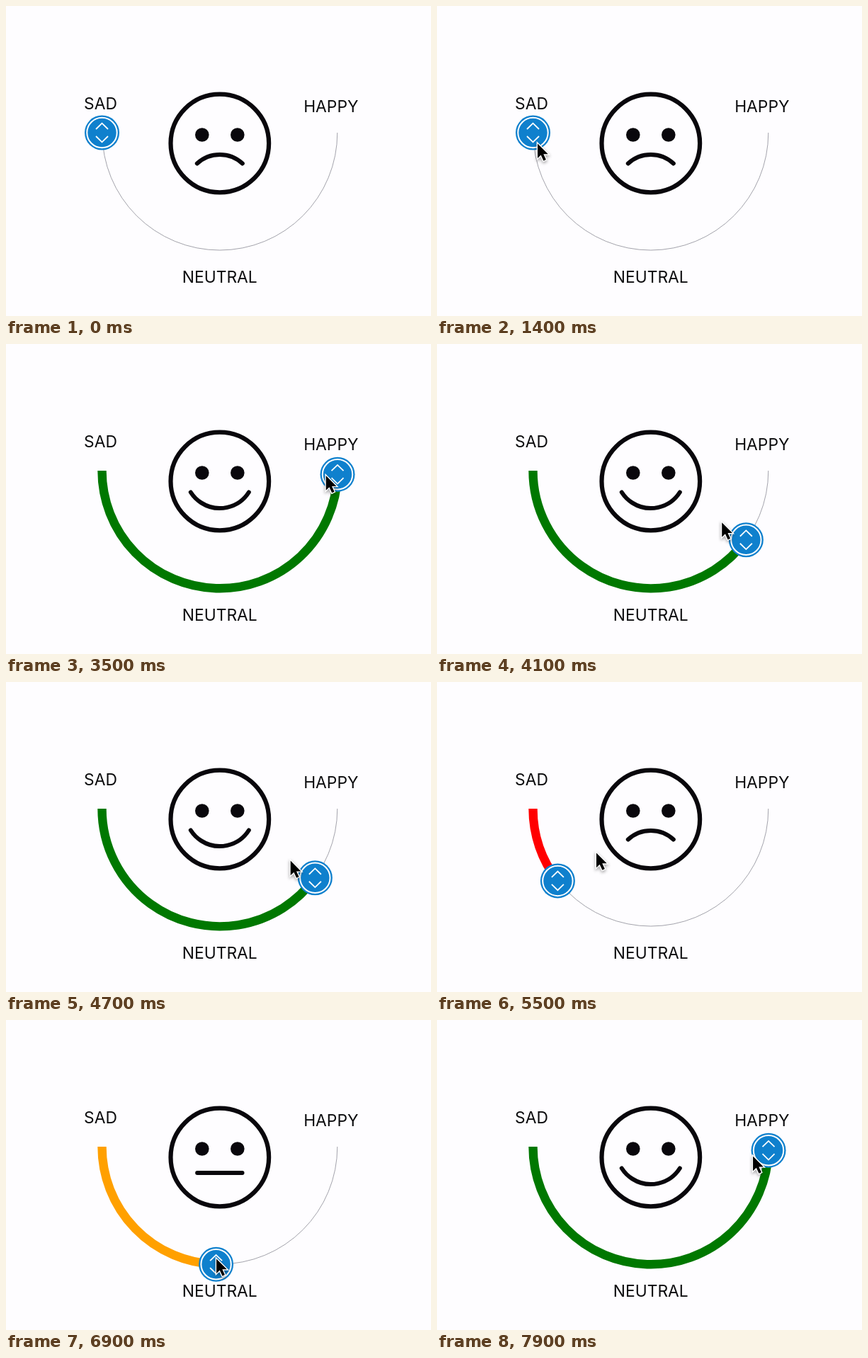
An HTML page with a canvas that plays this animation: 600 by 438 pixels, repeating every 8000 ms.

```html
<!DOCTYPE html>
<html lang="en">
<head>
<meta charset="utf-8">
<title>Mood slider</title>
<style>
  html, body { margin: 0; width: 100%; height: 100%; overflow: hidden; background: #fefdff; }
  svg, canvas { position: absolute; left: 0; top: 0; width: 600px; height: 438px; }
  text { font: 22.8px Inter, Roboto, sans-serif; fill: #0c0c0e; text-anchor: middle; }
</style>
</head>
<body>
<svg viewBox="0 0 600 438">
  <text x="133.5" y="146">SAD</text>
  <text x="458.8" y="150">HAPPY</text>
  <text x="301.8" y="391">NEUTRAL</text>
</svg>
<canvas id="stage" width="600" height="438"></canvas>
<script>
const ctx = document.getElementById('stage').getContext('2d');
const LOOP = 8000, STEP = 100;
const CX = 301.8, CY = 179, R = 166.3;
const INK = '#09070c', BLUE = '#0f80cd';
const ENTER = 400, GRAB = 1400, RELEASE = 7600;

// Pointer moves around the dial; angles run in degrees from the left end
const ENTRY = { angle: 20.2, radius: 284 };
const MOVES = [
  { from: ENTER, to: 1200, angle: 4.6, radius: 161 },
  { from: GRAB, to: 2800, angle: 194, radius: 162 },
  { from: 3100, to: 4150, angle: 144.4, radius: 122 },
  { from: 4700, to: 5100, angle: 37.7, radius: 98 },
  { from: 5900, to: 6900, angle: 88, radius: 156 },
  { from: 7200, to: RELEASE, angle: 178.2, radius: 150 },
  { from: RELEASE, to: 7900, angle: 175.6, radius: 144 }
];

const MOODS = [
  { limit: 33, color: '#ff0000', half: 32, sag: -12.5, y: 222.5 },
  { limit: 66, color: '#ffa000', half: 31.7, sag: 0, y: 216 },
  { limit: 100, color: '#007800', half: 41, sag: 22.5, y: 209.5 }
];

const clamp = (v, lo, hi) => Math.min(hi, Math.max(lo, v));
const rad = deg => deg * Math.PI / 180;
const ease = k => (1 - Math.cos(Math.PI * k)) / 2;

function pointerAt(t) {
  let { angle, radius } = ENTRY;
  for (const m of MOVES) {
    const k = ease(clamp((t - m.from) / (m.to - m.from), 0, 1));
    angle += (m.angle - angle) * k;
    radius += (m.radius - radius) * k;
  }
  return { angle, radius };
}

function valueAt(t) {
  if (t <= GRAB) return 0;
  return clamp(Math.round(pointerAt(Math.min(t, RELEASE)).angle / 1.8), 0, 100);
}

const onDial = (angle, r) => [CX - r * Math.cos(rad(angle)), CY + r * Math.sin(rad(angle))];

function stroke(color, width, cap = 'butt') {
  ctx.strokeStyle = color;
  ctx.lineWidth = width;
  ctx.lineCap = cap;
  ctx.stroke();
}

function arc(x, y, r, a = 0, b = 2 * Math.PI) {
  ctx.beginPath();
  ctx.arc(x, y, r, a, b);
}

function disc(x, y, r, color) {
  arc(x, y, r);
  ctx.fillStyle = color;
  ctx.fill();
}

function poly(points) {
  ctx.beginPath();
  points.forEach(([x, y]) => ctx.lineTo(x, y));
}

function drawFace({ half, sag, y }) {
  arc(CX, 194, 69.3);
  stroke(INK, 6.2);
  for (const s of [-1, 1]) disc(CX + s * 25, 182, 9.8, INK);
  if (sag) {
    const r = (half * half + sag * sag) / (2 * Math.abs(sag));
    const side = Math.sign(sag), mid = side * Math.PI / 2, a = Math.asin(half / r);
    arc(CX, y + sag - side * r, r, mid - a, mid + a);
  } else {
    poly([[CX - half, y], [CX + half, y]]);
  }
  stroke(INK, 6, 'round');
}

function drawTrack(angle, color) {
  arc(CX, CY, R - 0.3, 0, Math.PI);
  stroke('#8c8c96', 0.8);
  if (!angle) return;
  arc(CX, CY, R, Math.PI - rad(angle), Math.PI);
  stroke(color, 12.4);
}

function drawHandle(angle) {
  const [x, y] = onDial(angle, R);
  disc(x, y, 24.5, BLUE);
  arc(x, y, 21.2);
  stroke('#fff', 2);
  for (const s of [-1, 1]) {
    poly([[x - 8.5, y + s * 5], [x, y + s * 13.3], [x + 8.5, y + s * 5]]);
    stroke('#fff', 1.8);
  }
}

function drawPointer(x, y) {
  ctx.save();
  ctx.translate(x + 0.7, y + 2.5);
  ctx.scale(0.9, 0.9);
  poly([[0, 0], [0, 23], [5.2, 18], [9.4, 27], [13.2, 25.2], [9.2, 16.6], [16.4, 16.6]]);
  ctx.closePath();
  ctx.shadowColor = 'rgba(0,0,0,.4)';
  ctx.shadowBlur = 4;
  ctx.shadowOffsetY = 2;
  stroke('#fff', 3);
  ctx.shadowColor = 'transparent';
  ctx.fillStyle = '#000';
  ctx.fill();
  ctx.restore();
}

function draw(t) {
  const value = valueAt(t), angle = value * 1.8;
  const mood = MOODS.find(m => value <= m.limit);
  ctx.clearRect(0, 0, 600, 438);
  drawFace(mood);
  drawTrack(angle, mood.color);
  drawHandle(angle);
  if (t >= ENTER) {
    const p = pointerAt(t);
    drawPointer(...onDial(p.angle, p.radius));
  }
}

const start = performance.now();
function tick() {
  const t = (performance.now() - start) % LOOP;
  draw(Math.floor(t / STEP) * STEP);
  requestAnimationFrame(tick);
}
tick();
</script>
</body>
</html>
```
